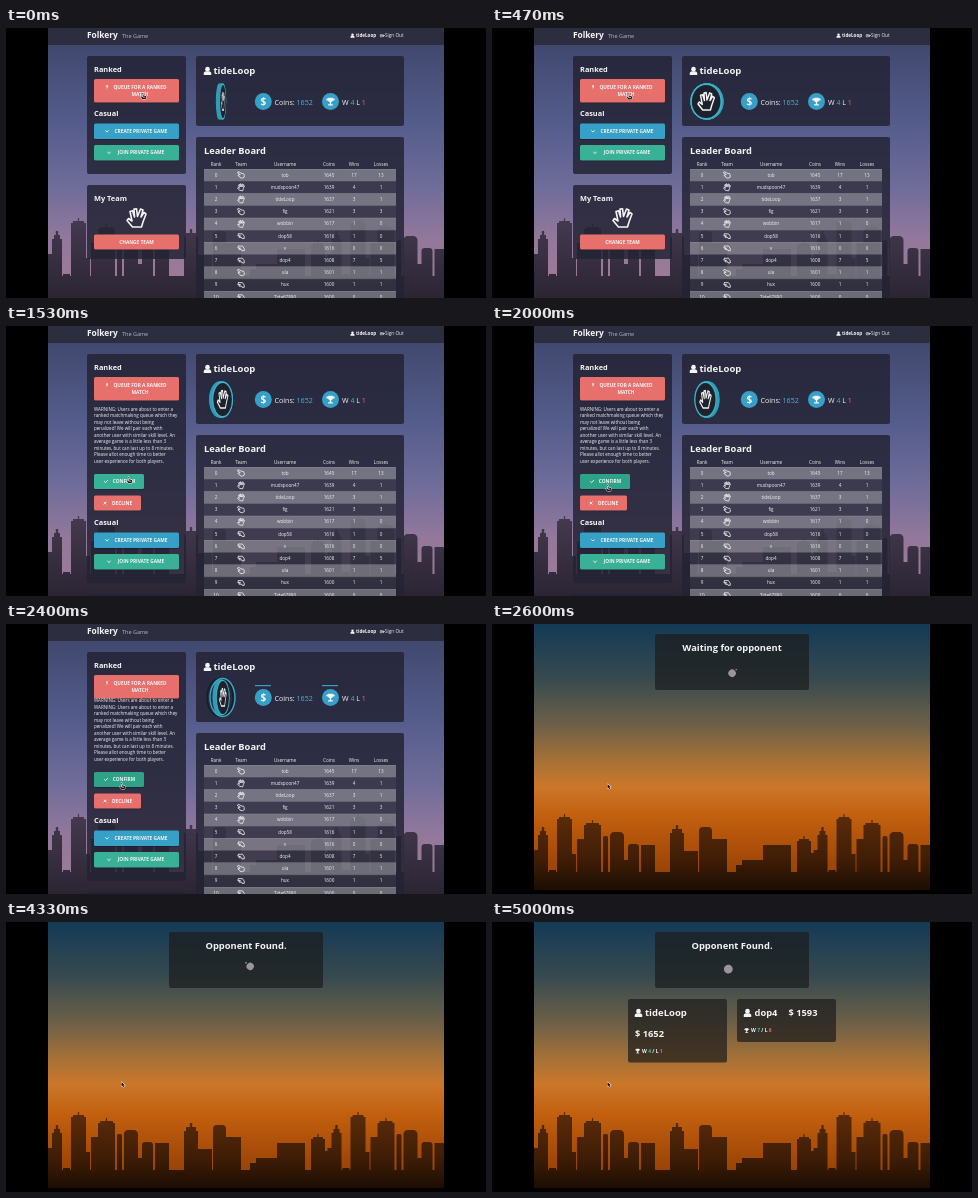
These frames come from a looping animation (480 by 270 pixels, 5070 ms). An HTML page with a canvas:

```html
<!DOCTYPE html>
<html lang="en">
<head>
<meta charset="utf-8">
<title>Folkery</title>
<style>
html, body { margin: 0; width: 100%; height: 100%; overflow: hidden; background: #000; }
canvas { display: block; width: 480px; height: 270px; }
</style>
</head>
<body>
<canvas id="stage" width="480" height="270"></canvas>
<script>
const ctx = document.getElementById('stage').getContext('2d');
const LOOP = 5070;
const EXPAND = 1270, GLITCH = [2330, 2470], MATCH = 2600, FOUND = 4330, CARDS = 4730;
const WHITE = '#f4f4f6', RED = '#e8706c', BLUE = '#36a0c6', GREEN = '#38b196';
const PLAYER = 'tideLoop', RIVAL = 'dop4';
const FACE = '"Open Sans", "Noto Sans", sans-serif';

const WARNING = [
  'WARNING: Users are about to enter a',
  'ranked matchmaking queue which they',
  'may not leave without being',
  'penalized! We will pair each with',
  'another user with similar skill level. An',
  'average game is a little less than 3',
  'minutes, but can last up to 8 minutes.',
  'Please allot enough time to better',
  'user experience for both players.'
];

// hand, name, coins, wins, losses
const BOARD = [
  ['point', 'tob', 1645, 17, 13], ['open', 'mudspoon47', 1639, 4, 1],
  ['open', PLAYER, 1637, 3, 1], ['point', 'fig', 1621, 3, 3],
  ['open', 'wobbin', 1617, 1, 0], ['flat', 'dop58', 1616, 1, 0],
  ['flat', 'v', 1616, 0, 0], ['flat', RIVAL, 1608, 7, 5],
  ['point', 'ula', 1601, 1, 1], ['flat', 'hux', 1600, 1, 1],
  ['flat', 'Tide67890', 1600, 0, 0]
];

const HANDS = {
  open: [-4,9, -9.5,2.5, -8,.5, -4.5,3, -6.5,-6.5, -4,-7.2, -2,-1, -2.5,-9, 0,-9.3, 1,-1.5, 4,-9, 6.5,-8, 4.5,-1, 7.5,-5.5, 9.5,-4, 6.5,4, 5,9],
  point: [-9,-8, -7,-9, 3,-4, 7,-4, 9,0, 9,6, 3,9, -3,7, -4,4, -8,2, -8,0, -2,-1, -9,-5],
  flat: [-8,-6, 4,-6, 9,1, 9,7, 3,7, 2,4, -5,4, -6,1, -1,0, -8,-1]
};

// x, width, top, roof
const CITY = [
  [42, 5, 226, ''], [46, 10, 211, 'spire'], [57, 7, 246, ''], [65, 15, 195, 'step'],
  [80, 4, 230, ''], [85, 8, 215, ''], [92, 17, 201, 'step'], [111, 5, 212, 'round'],
  [118, 14, 208, 'round'], [132, 5, 236, ''], [136, 11, 220, 'round'], [149, 14, 221, ''],
  [178, 14, 209, 'spire'], [192, 14, 227, ''], [207, 13, 203, 'round'], [219, 16, 215, ''],
  [244, 10, 241, ''], [250, 21, 236, ''], [271, 28, 221, ''], [305, 14, 217, 'step'],
  [319, 5, 229, '']
];

const lerp = (a, b, k) => a + (b - a) * k;
const clamp = v => Math.max(0, Math.min(1, v));
const ease = k => k * k * (3 - 2 * k);

function box(x, y, w, h, fill, r = 0) {
  ctx.fillStyle = fill;
  ctx.beginPath();
  ctx.roundRect(x, y, w, h, r);
  ctx.fill();
}

function disc(x, y, r, fill) {
  ctx.fillStyle = fill;
  ctx.beginPath();
  ctx.arc(x, y, r, 0, 7);
  ctx.fill();
}

// y is the middle of the capitals
function text(str, x, y, size, { bold = false, align = 'left', color = WHITE } = {}) {
  ctx.font = `${bold ? 700 : 400} ${size}px ${FACE}`;
  ctx.textAlign = align;
  ctx.fillStyle = color;
  ctx.fillText(str, x, y + size * .357);
  return x + ctx.measureText(str).width;
}

function runs(parts, x, y, size, bold) {
  for (const [str, color] of parts) x = text(str, x, y, size, { bold, color });
}

function trace(pts, x, y, k) {
  ctx.beginPath();
  for (let i = 0; i < pts.length; i += 2) ctx.lineTo(x + pts[i] * k, y + pts[i + 1] * k);
}

function poly(pts, x, y, k, fill) {
  trace(pts, x, y, k);
  ctx.fillStyle = fill;
  ctx.fill();
}

function line(pts, x, y, k, width, close) {
  trace(pts, x, y, k);
  if (close) ctx.closePath();
  ctx.lineJoin = ctx.lineCap = 'round';
  ctx.lineWidth = width;
  ctx.strokeStyle = WHITE;
  ctx.stroke();
}

const hand = (kind, x, y, k, width) => line(HANDS[kind], x, y, k, width, true);

function person(x, y, s) {
  disc(x, y - s * .22, s * .27, WHITE);
  box(x - s * .45, y + s * .02, s * .9, s * .45, WHITE, [s * .3, s * .3, s * .1, s * .1]);
}

function trophy(x, y, s) {
  box(x - s * .27, y - s * .45, s * .54, s * .55, WHITE, [0, 0, s * .25, s * .25]);
  box(x - s * .5, y - s * .35, s, s * .22, WHITE, s * .1);
  box(x - s * .08, y, s * .16, s * .4, WHITE);
  box(x - s * .28, y + s * .32, s * .56, s * .15, WHITE);
}

function glyph(kind, x, y) {
  if (kind === 'bolt') poly([-.4, -2, 1, -2, .4, -.6, 1.3, -.6, -.5, 2.2, 0, .2, -1, .2], x, y, 1, WHITE);
  if (kind === 'check') line([-1.6, 0, -.5, 1.1, 1.6, -1.1], x, y, 1, .9);
  if (kind === 'chevron') line([-1.5, -.6, 0, .8, 1.5, -.6], x, y, 1, .9);
  if (kind === 'cross') {
    line([-1.1, -1.1, 1.1, 1.1], x, y, 1, .9);
    line([1.1, -1.1, -1.1, 1.1], x, y, 1, .9);
  }
}

function button(x, y, w, h, fill, lines, labelX, icon, iconX) {
  box(x, y + .8, w, h, 'rgba(15,15,30,.45)', 1.5);
  box(x, y, w, h, fill, 1.5);
  const mid = y + h / 2 - (lines.length - 1) * 3.7;
  lines.forEach((s, i) => text(s, labelX, mid + i * 7.4, 4.8, { bold: true, align: 'center' }));
  if (icon) glyph(icon, iconX, mid);
}

function gradient(y0, y1, stops) {
  const g = ctx.createLinearGradient(0, y0, 0, y1);
  for (const [k, c] of stops) g.addColorStop(k, c);
  return g;
}

function skyline(fill) {
  ctx.fillStyle = fill;
  ctx.beginPath();
  ctx.rect(42, 248, 396, 22);
  for (const dx of [0, 279.5]) {
    for (const [bx, w, top, roof] of CITY) {
      const x = bx + dx, mid = x + w / 2;
      ctx.roundRect(x, top, w, 270 - top, roof === 'round' ? [w * .3, w * .3, 0, 0] : 0);
      if (roof === 'step') {
        ctx.rect(x + 2, top - 2, w - 4, 3);
        ctx.rect(mid - .6, top - 5, 1.2, 5);
      }
      if (roof === 'spire') {
        ctx.rect(x + 2, top - 4, w - 4, 5);
        ctx.rect(mid - 1.2, top - 8, 2.4, 6);
      }
    }
  }
  ctx.fill();
}

function coin(deg) {
  const a = ((deg + 90) % 180 + 180) % 180 - 90;
  const rad = a * Math.PI / 180;
  const rx = 17.5 * Math.cos(rad), shift = 2 * Math.sin(rad);
  const oval = (x, w, h, fill) => {
    ctx.fillStyle = fill;
    ctx.beginPath();
    ctx.ellipse(x, 73.5, Math.max(.5, w), h, 0, 0, 7);
    ctx.fill();
  };
  for (let k = 1; k >= -1; k -= .25) oval(215 + shift * k, rx, 18, '#2f9fb8');
  oval(215 - shift, rx, 18, '#41b2c8');
  oval(215 - shift, rx * .9, 16.6, '#1d222d');
  ctx.save();
  ctx.translate(215 - shift, 73.5);
  ctx.scale(Math.cos(rad), 1);
  hand('open', 0, 0, .95, 1.6);
  ctx.restore();
}

function coinEcho() {
  ctx.lineWidth = 1.4;
  [['#181c28', 214, 13], ['#38a9bd', 216.5, 12.5]].forEach(([color, x, rx]) => {
    ctx.strokeStyle = color;
    ctx.beginPath();
    ctx.ellipse(x, 73.5, rx, 19, 0, 0, 7);
    ctx.stroke();
  });
  box(249, 61, 16, 1.2, BLUE);
  box(316, 61, 16, 1.2, BLUE);
}

function arrow(x, y) {
  const shape = [0, 0, 0, 5, 1.2, 4, 2, 5.6, 2.9, 5.2, 2.1, 3.6, 3.6, 3.5];
  line(shape, x - 1, y - 2, .9, .9, true);
  poly(shape, x - 1, y - 2, .9, '#111');
}

function pointer(x, y) {
  const shape = [-1, -3, .2, -3, .4, -.6, 3, 0, 2.7, 3, -.6, 3, -2.4, .6, -1, .6];
  line(shape, x, y, 1, 1, true);
  poly(shape, x, y, 1, '#111');
  line([-.4, -2.2, -.4, 1, 1.6, 1.2], x, y, 1, .8);
}

function cursor(t) {
  const path = [[0, 137, 68], [930, 137, 69], [1280, 137, 69], [1530, 123, 154], [1720, 116, 162]];
  const i = path.findIndex(p => p[0] > t);
  if (i < 0) return pointer(116, 162);
  const [a, b] = [path[i - 1], path[i]];
  const k = ease((t - a[0]) / (b[0] - a[0]));
  pointer(lerp(a[1], b[1], k), lerp(a[2], b[2], k));
}

function leaderBoard(panel) {
  box(190, 109, 208, 170, panel, 2);
  text('Leader Board', 198, 123, 9.3, { bold: true });
  const cols = [210, 235, 279, 323, 348, 375];
  ['Rank', 'Team', 'Username', 'Coins', 'Wins', 'Losses'].forEach((s, i) =>
    text(s, cols[i], 136, 4.6, { align: 'center' }));
  BOARD.forEach(([kind, ...cells], i) => {
    const y = 147 + i * 12.2;
    box(198, y - 6.1, 192, 12.2, i % 2 ? 'rgba(255,255,255,.06)' : 'rgba(255,255,255,.33)');
    box(198, y - 6.1, 192, .5, 'rgba(255,255,255,.15)');
    text(i, cols[0], y, 4.6, { align: 'center' });
    hand(kind, cols[1], y, .36, .8);
    cells.forEach((s, c) => text(s, cols[c + 2], y, 4.6, { align: 'center' }));
  });
}

function lobby(t) {
  const open = t >= EXPAND, glitch = t >= GLITCH[0] && t < GLITCH[1];
  const panel = 'rgba(35,35,52,.84)';
  const dy = open ? 111 : 0;

  box(42, 0, 396, 270, gradient(0, 270, [
    [0, '#3d4468'], [.35, '#545c8b'], [.6, '#716d9a'], [.78, '#92789b'], [1, '#a07c94']]));
  skyline(gradient(190, 270, [[0, '#453a50'], [1, '#2b2533']]));

  box(42, 0, 396, 17, '#2d2d40');
  text('Folkery', 81, 7.5, 8.4, { bold: true });
  text('The Game', 116, 8.3, 5.5, { color: '#b9b9c4' });
  person(346.5, 7.7, 4.6);
  text(PLAYER, 350, 7.7, 4.6, { bold: true });
  line([1.2, -1.5, -1.4, -1.5, -1.4, 1.5, 1.2, 1.5], 375.3, 7.7, .7, .6);
  line([-.6, 0, 2.2, 0, 1.2, -1, 2.2, 0, 1.2, 1], 376, 7.7, 1, .7);
  text('Sign Out', 379, 7.7, 4.7);

  box(81, 28, 99, 118 + dy, panel, 2);
  text('Ranked', 88, 41, 7.4, { bold: true });
  const pressed = t > 560 && t < EXPAND;
  button(88, 51, 85, 23.5, pressed ? '#d3594f' : RED, ['QUEUE FOR A RANKED', 'MATCH'], 134, 'bolt', 101);
  if (open) {
    if (glitch) text(WARNING[0], 88, 76.4, 4.55);
    WARNING.forEach((s, i) => text(s, 88, 83 + i * 6.55, 4.55));
    button(88, 148, 50, 15, t > 1720 ? '#2fa388' : GREEN, ['CONFIRM'], 118, 'check', 100);
    button(88, 169.5, 47, 15, RED, ['DECLINE'], 116, 'cross', 99);
  }
  text('Casual', 88, 85.5 + dy, 7.4, { bold: true });
  button(88, 95.5 + dy, 85, 15.5, BLUE, ['CREATE PRIVATE GAME'], 135, 'chevron', 101);
  button(88, 117 + dy, 85, 15.5, GREEN, ['JOIN PRIVATE GAME'], 135, 'chevron', 103);

  box(81, 157 + dy, 99, 74, panel, 2);
  text('My Team', 88, 170 + dy, 7.4, { bold: true });
  hand('open', 130.5, 190 + dy, 1, 1.6);
  button(88, 206.5 + dy, 85, 15, RED, ['CHANGE TEAM'], 130.5);

  box(190, 28, 208, 70, panel, 2);
  person(201.5, 43, 8.5);
  text(PLAYER, 207.5, 43, 9.5, { bold: true });
  coin(-80 + .605 * t);
  if (glitch) coinEcho();
  disc(257.3, 73.5, 8.5, BLUE);
  text('$', 257.3, 73.5, 10, { bold: true, align: 'center' });
  runs([['Coins: ', WHITE], ['1652', '#4fb4d2']], 268.5, 74, 7.1);
  disc(324.5, 73.5, 8.5, BLUE);
  trophy(324.5, 73.5, 8.5);
  runs([['W ', WHITE], ['4', '#3fbfae'], [' L ', WHITE], ['1', RED]], 336, 74, 7.1);

  leaderBoard(panel);
  cursor(t);
}

// two dots that swell in turn while the pair rotates
function spinner(t) {
  const turn = ((t - 3330) / 1000 + .861 + 4) % 1;
  ctx.save();
  ctx.translate(240, 45);
  ctx.rotate(turn * Math.PI * 2);
  [[turn, -2.8], [(turn + .5) % 1, 2.8]].forEach(([phase, y]) =>
    disc(3.2, y, 4.5 * ease(clamp(1 - Math.abs(phase * 2 - 1))), '#9b959a'));
  ctx.restore();
}

function record(wins, losses, x, y) {
  trophy(x + 2.7, y, 5);
  runs([['W ', WHITE], [wins, '#3fbfae'], [' / L ', WHITE], [losses, '#f0685a']], x + 7, y, 5, true);
}

function cards(panel) {
  box(136, 77, 99, 63.5, panel, 2);
  person(146.5, 91, 8.5);
  text(PLAYER, 153, 91, 9.5, { bold: true });
  text('$ 1652', 143, 111.5, 9.3, { bold: true });
  record('4', '1', 143, 129);

  box(245, 77, 99, 43, panel, 2);
  person(255.5, 91, 8.5);
  text(RIVAL, 262.5, 91, 9.3, { bold: true });
  text('$ 1593', 296.5, 91, 9.3, { bold: true });
  record('7', '6', 252, 108.5);
}

function match(t) {
  const panel = 'rgba(28,28,28,.7)';
  box(42, 0, 396, 266, gradient(0, 266, [
    [0, '#143a56'], [.2, '#36494f'], [.38, '#6d6048'], [.5, '#a07038'],
    [.61, '#cb772b'], [.72, '#c2600f'], [.86, '#a84c08'], [1, '#8a3c06']]));
  ctx.save();
  ctx.beginPath();
  ctx.rect(42, 0, 396, 266);
  ctx.clip();
  skyline(gradient(190, 266, [[0, '#5c2c0a'], [.6, '#3f1d06'], [1, '#1d0d03']]));
  ctx.restore();

  box(163, 10, 154, 56, panel, 2);
  text(t < FOUND ? 'Waiting for opponent' : 'Opponent Found.', 240, 23.5, 9.35, { bold: true, align: 'center' });
  spinner(t);
  if (t >= CARDS) cards(panel);
  arrow(116.5, 162);
}

function draw() {
  const t = performance.now() % LOOP;
  ctx.save();
  box(0, 0, 480, 270, '#000');
  ctx.beginPath();
  ctx.rect(42, 0, 396, 270);
  ctx.clip();
  if (t < MATCH) lobby(t); else match(t);
  ctx.restore();
  requestAnimationFrame(draw);
}
requestAnimationFrame(draw);
</script>
</body>
</html>
```
